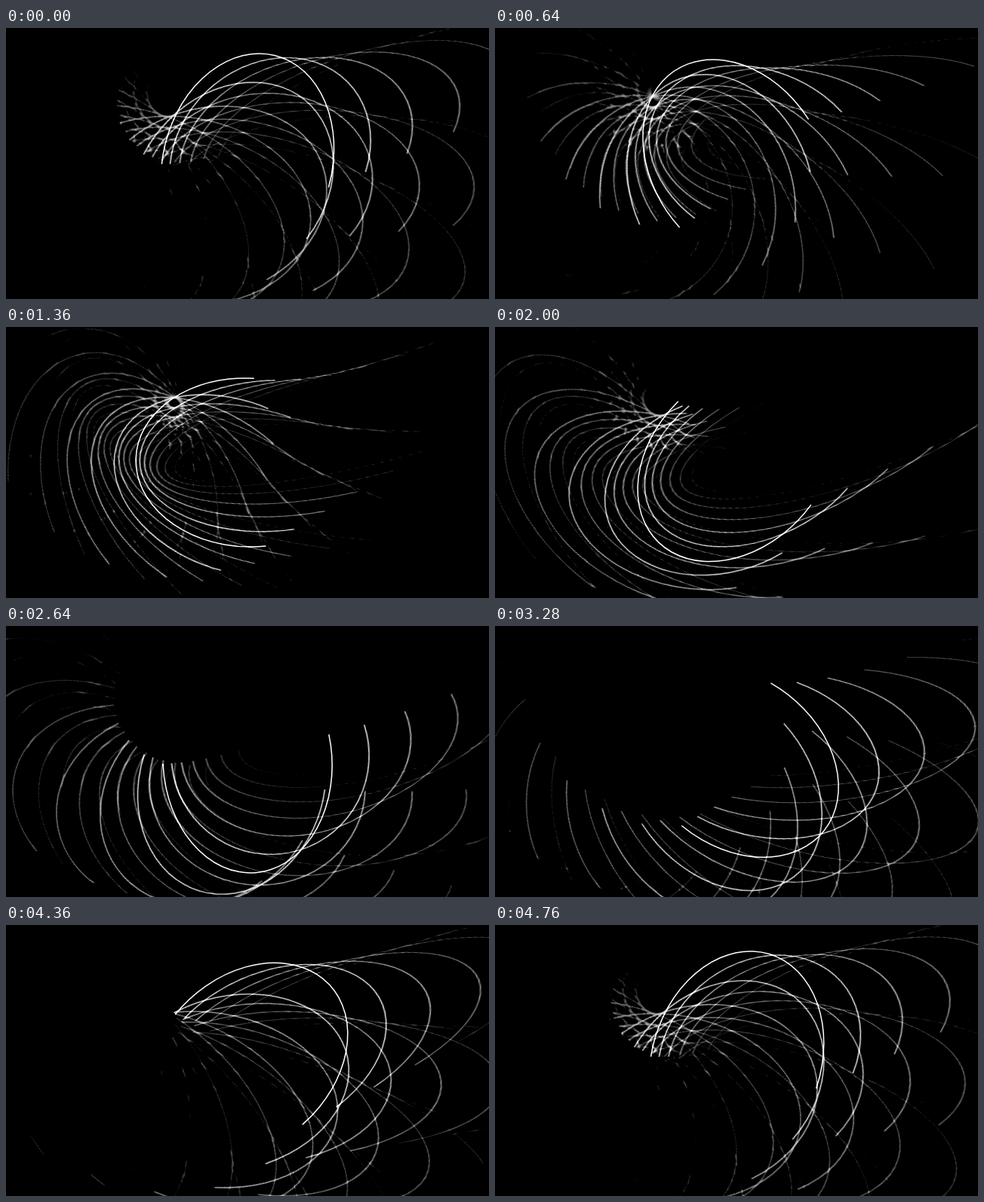
These frames come from a looping animation (640x360 px, 4800 ms). An HTML page with a canvas:

```html
<!DOCTYPE html>
<html lang="en">
<head>
<meta charset="utf-8">
<title>Echoing arc</title>
<style>
  html, body { margin: 0; width: 100%; height: 100%; overflow: hidden; background: #000; }
  canvas { display: block; width: 640px; height: 360px; }
</style>
</head>
<body>
<canvas id="stage" width="640" height="360"></canvas>
<script>
const W = 640, H = 360, CX = W / 2, CY = H / 2;
const STEP = 40, FRAMES = 120, WARMUP = 32;
const rad = d => d * Math.PI / 180;

const stage = document.getElementById('stage').getContext('2d');
const pen = Object.assign(document.createElement('canvas'), { width: W, height: H })
  .getContext('2d', { willReadFrequently: true });
const picture = stage.createImageData(W, H);
const pixels = new Uint32Array(picture.data.buffer);

// Each echo scales the previous picture, turns it and shifts it.
const drift = { turn: rad(-6), sx: 1.17, sy: 0.893, dx: 30, dy: -8.7 };
const swirl = { turn: rad(17.4), sx: 1.093, sy: 1.002, dx: -20.8, dy: 30 };
// Brightness taken off per echo: lone lines thin out and break up, crossings last longer.
const LOSS = 25;

const buffer = () => new Float32Array(W * H);
let row = buffer(), rowNext = buffer();
let field = buffer(), fieldNext = buffer();

function drawArc(n) {
  pen.fillStyle = '#000';
  pen.fillRect(0, 0, W, H);
  pen.strokeStyle = '#fff';
  pen.lineWidth = 1.5;
  pen.beginPath();
  const axis = rad(-75.5 - 360 * (n % FRAMES) / FRAMES);
  pen.ellipse(CX, CY, 148, 112, axis, rad(-101.4), rad(91.5));
  pen.stroke();
  return pen.getImageData(0, 0, W, H).data;
}

// dst = base + dimmed, transformed src (bilinear sampling)
function echo(src, dst, map, base, stride) {
  const c = Math.cos(map.turn), s = Math.sin(map.turn);
  const ux = c / map.sx, uy = -s / map.sy;
  for (let y = 0, i = 0; y < H; y++) {
    const qx = 0.5 - CX - map.dx, qy = y + 0.5 - CY - map.dy;
    let u = (c * qx + s * qy) / map.sx + CX - 0.5;
    let v = (c * qy - s * qx) / map.sy + CY - 0.5;
    for (let x = 0; x < W; x++, i++, u += ux, v += uy) {
      let value = 0;
      if (u >= 0 && v >= 0 && u < W - 1 && v < H - 1) {
        const iu = u | 0, iv = v | 0, fu = u - iu, fv = v - iv, k = iv * W + iu;
        const top = src[k] + (src[k + 1] - src[k]) * fu;
        const low = src[k + W] + (src[k + W + 1] - src[k + W]) * fu;
        value = Math.max(0, top + (low - top) * fv - LOSS);
      }
      dst[i] = Math.min(255, value + base[i * stride]);
    }
  }
}

function advance(n) {
  echo(row, rowNext, drift, drawArc(n), 4);
  [row, rowNext] = [rowNext, row];
  echo(field, fieldNext, swirl, row, 1);
  [field, fieldNext] = [fieldNext, field];
}

function show() {
  for (let i = 0; i < pixels.length; i++) {
    pixels[i] = 0xff000000 | Math.round(field[i]) * 0x010101;
  }
  stage.putImageData(picture, 0, 0);
}

let current = -Infinity;

// The echoes die out within WARMUP steps, so any moment can be rebuilt.
function render(n) {
  if (n === current) return;
  if (n < current || n - current > WARMUP) {
    row.fill(0);
    field.fill(0);
    current = n - WARMUP;
  }
  while (current < n) advance(++current);
  show();
}

const start = performance.now();
function tick() {
  render(Math.floor((performance.now() - start) / STEP));
  requestAnimationFrame(tick);
}
tick();
</script>
</body>
</html>
```
